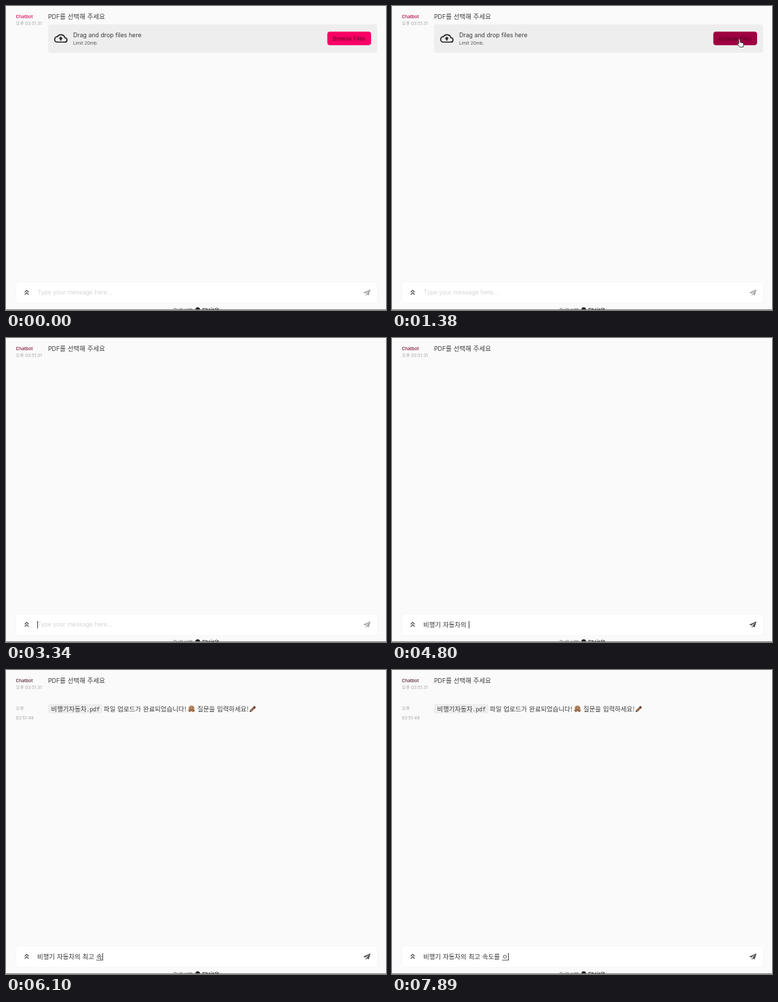
These frames come from a looping animation (560x448 px, 8000 ms). An HTML page:

```html
<!DOCTYPE html>
<html lang="ko">
<head>
<meta charset="utf-8">
<title>PDF chatbot</title>
<style>
  html, body { margin: 0; width: 100%; height: 100%; overflow: hidden; background: #fafafa; }
  svg { position: absolute; left: 0; top: 0; }
  text { font: 8.8px Inter, sans-serif; fill: #3c3c3c; white-space: pre; }
  .k { font: 9.45px "Noto Sans CJK KR", sans-serif; word-spacing: .3px; }
  .small { font-size: 6.6px; fill: #555; }
  .time { font-size: 6.4px; fill: #a3a3a3; }
  .time .k { font-size: 6.5px; }
  #name { font-weight: 500; }
  #label { font-size: 7.7px; font-weight: 500; letter-spacing: .13px; }
  #placeholder { fill: #d4d4d4; }
  #input { position: absolute; left: 46px; top: 414.5px; height: 14px; line-height: 14px; white-space: pre; color: #333; }
  #typing { position: relative; }
  #typing:not(:empty)::after { content: ""; position: absolute; left: 0; right: 0; bottom: 1px; border-bottom: 1px solid #666; }
  #caret { position: absolute; top: 2px; width: 1px; height: 11px; background: #444; }
</style>
</head>
<body>
<svg width="560" height="448" viewBox="0 0 560 448">
  <text id="name" class="small" x="14.5" y="17.8">Chatbot</text>
  <text class="time" x="14.5" y="28.3"><tspan class="k">오후</tspan> 03:51:31</text>
  <text x="62" y="18.7">PDF<tspan class="k">를 선택해 주세요</tspan></text>

  <g id="upload">
    <rect x="62" y="27" width="485" height="42" rx="4" fill="#eee"/>
    <g transform="translate(70.9 37.7) scale(.82)">
      <path d="M6 19h13a4 4 0 0 0 .3-8A7.4 7.4 0 0 0 6 9a5 5 0 0 0 0 10z" fill="none" stroke="#222" stroke-width="2"/>
      <path d="M8 13h2.55v3h2.9v-3H16l-4-4z" fill="#222"/>
    </g>
    <text x="99" y="45.6">Drag and drop files here</text>
    <text class="small" x="99" y="56.8">Limit 20mb.</text>
    <rect id="button" x="473.5" y="37.7" width="64.5" height="20" rx="4"/>
    <text id="label" x="481.5" y="50.6">Browse Files</text>
  </g>

  <g id="reply">
    <text class="time" x="14.5" y="59.2"><tspan class="k">오후</tspan></text>
    <text class="time" x="14.5" y="72.8">03:51:49</text>
    <rect x="62" y="50" width="80" height="14" rx="2" fill="#eee"/>
    <text x="66.5" y="60.5"><tspan class="k">비행기자동차</tspan><tspan style="font:8.1px 'Noto Sans Mono',monospace">.pdf</tspan></text>
    <text class="k" x="144" y="60.5">파일 업로드가 완료되었습니다!</text>
    <circle cx="273.4" cy="56.6" r="4.4" fill="#b98d68"/>
    <path d="M271 55.5h1.3M274.6 55.5h1.3M271 57.8q2.4 2.4 4.8 0" fill="none" stroke="#5b3a28" stroke-width=".9"/>
    <path d="M269.6 59.6l1.6 1.2M277.2 59.6l-1.6 1.2" stroke="#95643f" stroke-width="2.2" stroke-linecap="round"/>
    <text class="k" x="282" y="60.5">질문을 입력하세요!</text>
    <path d="M361 60.2 366.7 54.5" stroke="#94674c" stroke-width="3.2"/>
    <path d="M359 62l.9-3 2.2 2.2z" fill="#332"/>
    <path d="M365.4 55.8 367.2 54" stroke="#6e3f38" stroke-width="3.2"/>
  </g>

  <rect x="14.5" y="406.5" width="533" height="32" rx="5" fill="#fff" stroke="#f5f5f5"/>
  <path transform="translate(23.9 415.4) scale(.55)" fill="#333" d="M6 17.6 7.4 19l4.6-4.6 4.6 4.6 1.4-1.4-6-6zM6 11l1.4 1.4L12 7.8l4.6 4.6L18 11l-6-6z"/>
  <path id="send" d="M537.2 417.5 526.5 422.3 529.5 423.8 535 419.5 531 424.6 534.6 426.4zM529.8 424.5 530.4 427 531.8 425.4z"/>
  <text id="placeholder" x="46.3" y="425.1">Type your message here...</text>

  <text class="small" x="247" y="449.7">Built with</text>
  <circle cx="282.5" cy="447.6" r="3.5" fill="#222"/>
  <text class="small" x="289" y="449.7" style="font-weight:700;fill:#222">Chainlit</text>
  <rect y="447" width="560" height="1" fill="#808080"/>

  <g id="pointer" stroke="#222" stroke-width=".8" stroke-linejoin="round" fill="#fff">
    <path id="arrow" d="M0 0v11l2.6-2.4 1.7 3.8 1.6-.7-1.7-3.7h3.5z"/>
    <path id="hand" d="M-1 .8q1-1.4 2 0V5l4.2 1q1 .3.9 1.5L5.5 12H.3L-2.8 7.6q.3-1.4 1.8-.2z"/>
  </g>
</svg>
<div id="input" class="k"><span id="done"></span><span id="typing"></span><span id="caret"></span></div>

<script>
const LOOP = 8000;
const $ = id => document.getElementById(id);
const show = (id, on) => { $(id).style.display = on ? "" : "none"; };
const clamp = x => Math.max(0, Math.min(1, x));
const mix = (a, b, k) => a + (b - a) * k;
const rgb = (a, b, k) => `rgb(${a.map((v, i) => Math.round(mix(v, b[i], k)))})`;

// Each state of the input; a Hangul syllable at the end is still being composed.
const first = "비행기 자동차의 ", second = first + "최고 ", third = second + "속도를 ";
const typed = [
  [0, ""], [4800, first], [5280, first + "ㅊ"], [5440, first + "초"], [5600, first + "최"],
  [5690, first + "최고"], [5810, second], [5890, second + "ㅅ"], [5980, second + "소"],
  [6060, second + "속"], [6140, second + "속도"], [6220, second + "속돌"], [6300, second + "속도르"],
  [6370, second + "속도를"], [6470, third], [6550, third + "ㅇ"], [6610, third + "아"], [6670, third + "알"],
  [6880, third + "알ㄹ"], [6970, third + "알려"], [7070, third + "알려ㅈ"], [7270, third + "알려주"],
  [7320, third + "알려주세"], [7460, third + "알려주"], [7590, third + "알려"],
  [7740, third + "알"], [7890, third + "ㅇ"]
];

function drawInput(t) {
  const text = typed.findLast(step => step[0] <= t)[1];
  const composing = text && !text.endsWith(" ");
  $("done").textContent = composing ? text.slice(0, -1) : text;
  $("typing").textContent = composing ? text.slice(-1) : "";
  show("placeholder", !text);
  $("send").setAttribute("fill", text ? "#555" : "#a6a6a6");
  show("caret", text || t >= 3340 && (t - 3340) % 1000 < 500);
}

function drawPointer(t) {
  const k = 1 - (1 - clamp((t - 110) / 490)) ** 3;
  const x = mix(420, 512, k), y = mix(300, 48.5, k);
  const over = y < 57;
  $("pointer").setAttribute("transform", `translate(${x} ${y})`);
  show("pointer", t >= 110 && t < 2750);
  show("arrow", !over);
  show("hand", over);
}

function draw(t) {
  const hover = clamp((t - 400) / 250);
  $("button").setAttribute("fill", rgb([248, 0, 100], [158, 0, 64], hover));
  $("label").style.fill = rgb([110, 0, 42], [92, 0, 36], hover);
  $("name").style.fill = t < 400 ? "#d80056" : t < 3250 ? "#b00046" : t < 6060 ? "#7d1238" : "#54202c";
  show("upload", t < 3250);
  show("reply", t >= 6060);
  drawInput(t);
  drawPointer(t);
}

const start = performance.now();
function frame() {
  draw((performance.now() - start) % LOOP);
  requestAnimationFrame(frame);
}
frame();
</script>
</body>
</html>
```
